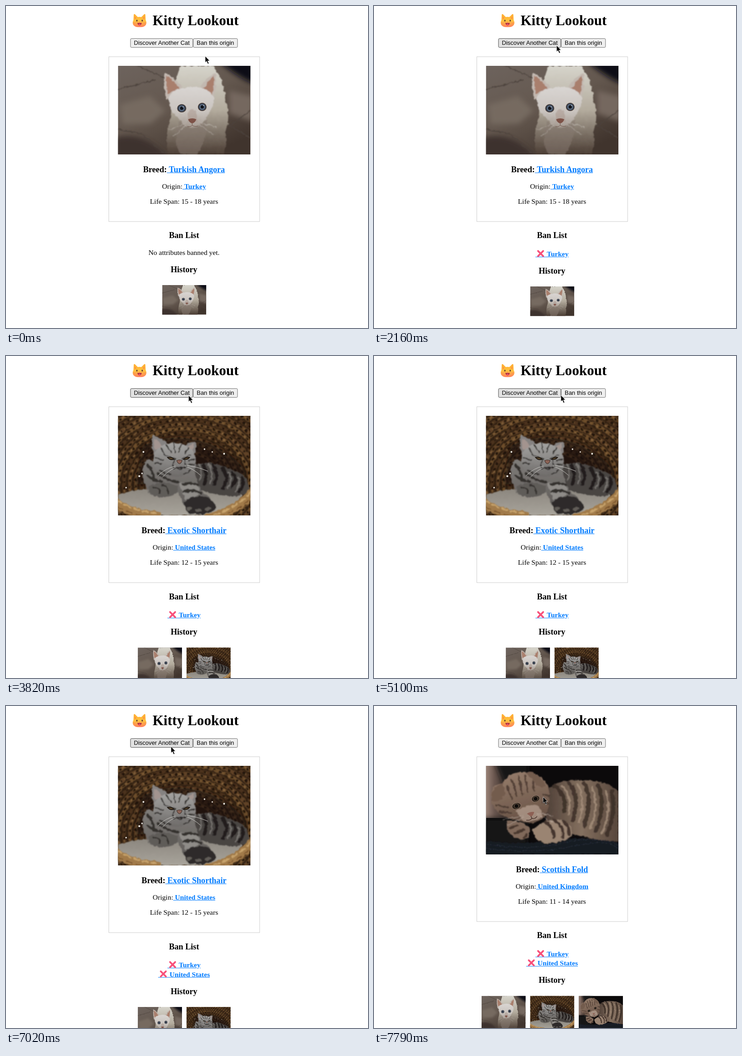
Write an HTML page that moves like this. It is 794 px wide and 705 px high and loops after 8000 ms.

```html
<!DOCTYPE html>
<html lang="en">
<head>
<meta charset="utf-8">
<title>Kitty Lookout</title>
<style>
html, body { margin: 0; width: 100%; height: 100%; overflow: hidden; background: #fff; }
#stage { position: relative; width: 794px; height: 705px; overflow: hidden; }
#page {
  position: absolute; box-sizing: border-box; width: 805px; padding-top: 73.2px;
  transform: scale(.97); transform-origin: 0 0;
  font: 16px/18px "Liberation Serif", "Times New Roman", serif; color: #000; text-align: center;
}
h1 { position: absolute; left: 331.4px; top: 14.4px; margin: 0; font-size: 32px; line-height: 37px; white-space: nowrap; }
#face { position: absolute; left: 285.6px; top: 18.4px; width: 32px; height: 30px; }
h3 { margin: 18.72px 0; font-size: 18.72px; line-height: 22px; }
p { margin: 16px 0; }
#buttons { display: flex; justify-content: center; height: 21px; }
button {
  box-sizing: border-box; height: 21px; margin: 0; padding: 0 7px; border: 1px solid #6b6b6b; border-radius: 3px;
  background: #efefef; color: #000; font: 13.333px/19px "Liberation Sans", Arial, sans-serif; white-space: nowrap;
}
button.hover { background: #e2e2e2; border-color: #454545; }
button.down { background: #f5f5f5; border-color: #8d8d8d; }
button.lit { border-color: #333; }
#card { box-sizing: border-box; width: 342px; margin: 20px auto; padding: 20px 20px 35.5px; border: 1px solid #ccc; }
#card h3 { margin-top: 22.4px; }
#card p:last-child { margin-bottom: 0; }
#card svg { display: block; width: 300px; }
a { color: #007bff; font-weight: bold; text-decoration: underline; }
.ban { height: 21px; line-height: 24px; }
.ban span { position: relative; letter-spacing: 17.9px; }
.ban svg { position: absolute; left: 2.8px; top: -.4px; width: 17.5px; height: 17.5px; }
#bans p { margin: 0; }
#thumbs { display: flex; justify-content: center; }
#thumbs svg { width: 100px; margin: 5px; }
#cursor { position: absolute; left: 0; top: 0; width: 12px; height: 19px; overflow: visible; }
.defs { position: absolute; width: 0; height: 0; }
.line { fill: none; stroke-linecap: round; stroke-linejoin: round; }
</style>
</head>
<body>
<svg class="defs">
  <defs>
    <filter id="soft">
      <feTurbulence type="fractalNoise" baseFrequency=".12" numOctaves="2" seed="4"/>
      <feDisplacementMap in="SourceGraphic" scale="7" xChannelSelector="R" yChannelSelector="G"/>
      <feGaussianBlur stdDeviation="1"/>
    </filter>
    <filter id="haze" x="-30%" y="-30%" width="160%" height="160%"><feGaussianBlur stdDeviation="6"/></filter>
    <linearGradient id="floor" x2=".7" y2="1"><stop stop-color="#6d635d"/><stop offset=".5" stop-color="#64584f"/><stop offset="1" stop-color="#40342d"/></linearGradient>
    <linearGradient id="white" x2="0" y2="1"><stop stop-color="#d6d4cb"/><stop offset=".5" stop-color="#b3ab9d"/><stop offset="1" stop-color="#4b3d34"/></linearGradient>
    <linearGradient id="pale" x2="0" y2="1"><stop stop-color="#d9d5d2"/><stop offset=".6" stop-color="#c9c3be"/><stop offset="1" stop-color="#a0958b"/></linearGradient>
    <linearGradient id="silver" x2="0" y2="1"><stop stop-color="#807d7a"/><stop offset="1" stop-color="#5c5855"/></linearGradient>
    <linearGradient id="muzzle" x2="0" y2="1"><stop stop-color="#a3a2a0"/><stop offset=".5" stop-color="#8b8987"/><stop offset="1" stop-color="#6d6a68"/></linearGradient>
    <linearGradient id="pad" x2="0" y2="1"><stop stop-color="#8a857d"/><stop offset="1" stop-color="#a8a49b"/></linearGradient>
    <linearGradient id="wall"><stop stop-color="#9b8378"/><stop offset=".25" stop-color="#6a574f"/><stop offset="1" stop-color="#0c0a0b"/></linearGradient>
    <linearGradient id="tabby" x2=".3" y2="1"><stop stop-color="#99806e"/><stop offset="1" stop-color="#6a5447"/></linearGradient>
    <linearGradient id="flank"><stop stop-color="#4d3e36"/><stop offset=".5" stop-color="#84705f"/><stop offset="1" stop-color="#56453b"/></linearGradient>
    <linearGradient id="gold" x2="0" y2="1"><stop stop-color="#ffab2e"/><stop offset=".5" stop-color="#ffc440"/><stop offset="1" stop-color="#ff7d5c"/></linearGradient>
  </defs>

  <symbol id="cat0" viewBox="0 0 291 194" preserveAspectRatio="none">
    <path fill="url(#floor)" d="M0 0H291V194H0Z"/>
    <g filter="url(#haze)">
      <path fill="#0e1017" d="M222-10H310V44Q262 26 222-10Z"/>
      <path fill="#766a61" d="M4 85 70 66 104 98 72 126 10 128Z"/>
      <path fill="#3d322d" d="M-8 158Q60 140 112 204H-8Z"/>
      <path fill="#74685e" d="M244 54 296 66V122L244 104Z"/>
    </g>
    <g filter="url(#soft)">
      <path class="line" stroke="#4c423c" stroke-width="2" d="M42 0 112 30M0 52 82 30M0 140 50 148 100 190M238 128 291 158M246 130 291 98"/>
      <path fill="url(#white)" d="M138 0H208Q232 28 237 78Q248 112 236 142Q240 170 232 194H110Q102 150 116 112Q120 40 138 0Z"/>
      <path fill="#c2b8b0" d="M106 74Q99 38 102 17Q112 14 144 50ZM179 48Q203 18 213 15Q219 34 210 74Z"/>
      <path fill="#a97f6d" d="M110 61Q104 38 106 23Q116 24 135 50ZM188 50Q203 26 211 21Q214 38 206 61Z"/>
      <path fill="url(#pale)" d="M110 72Q118 52 146 48Q164 44 182 48Q204 54 211 70Q211 94 196 110Q184 134 164 138Q145 136 136 117Q113 100 110 72Z"/>
      <path fill="#85796f" opacity=".55" d="M134 122Q162 150 196 116Q196 164 174 194H136Q120 156 134 122Z"/>
      <path fill="#a8948a" d="M154 100Q163 92 172 100L174 122H152Z" opacity=".5"/>
      <path class="line" stroke="#cdc7c2" stroke-width=".7" d="M149 126 112 140M150 130 120 155M178 124 216 134M178 129 208 150"/>
    </g>
    <path fill="#7d5247" d="M154 117Q163 113 172 117Q169 125 163 126Q157 125 154 117Z"/>
    <path class="line" stroke="#73594f" d="M163 126V130M153 133Q160 134 163 130Q168 134 175 132"/>
    <g fill="#2f3845" stroke="#594a44" stroke-width="1.2"><ellipse cx="140" cy="93" rx="9.5" ry="8.5"/><ellipse cx="185" cy="90" rx="9" ry="8.5"/></g>
    <g fill="#59687e"><circle cx="140" cy="93" r="6.5"/><circle cx="185" cy="90" r="6.5"/></g>
    <g fill="#10141c"><circle cx="140" cy="93" r="3.6"/><circle cx="185" cy="90" r="3.6"/></g>
    <g fill="#c9d1db"><circle cx="143" cy="90" r="1"/><circle cx="188" cy="87" r="1"/></g>
  </symbol>

  <symbol id="cat1" viewBox="0 0 291 218" preserveAspectRatio="none">
    <path fill="#302013" d="M0 0H291V218H0Z"/>
    <g id="weave" class="line" filter="url(#soft)"></g>
    <path fill="#120c08" opacity=".6" filter="url(#haze)" d="M54 66Q120 30 206 62Q270 96 286 130L210 150H36Z"/>
    <g fill="#e9e6df"><circle cx="56" cy="79" r="2"/><circle cx="47" cy="132" r="2.2"/><circle cx="53" cy="126" r="1.8"/><circle cx="190" cy="73" r="1.8"/><circle cx="233" cy="83" r="2"/><circle cx="207" cy="79" r="1.5"/><circle cx="18" cy="157" r="1.7"/></g>
    <g filter="url(#soft)">
      <path fill="url(#pad)" d="M0 172Q62 154 150 158Q240 160 274 174Q254 204 196 218H44Q14 204 0 190Z"/>
      <path fill="#484543" d="M164 110Q202 94 242 116Q292 126 288 166Q268 180 230 174L166 160Z"/>
      <path class="line" stroke="#211e1c" stroke-width="8" d="M188 108Q198 126 190 148M208 107Q222 124 212 150M230 116Q246 138 230 158M252 126Q264 140 250 154M272 136Q278 150 266 166"/>
      <path class="line" stroke="#77736f" stroke-width="3" d="M178 106Q186 124 180 142M199 105Q210 126 202 148M242 124Q254 140 240 158M264 134Q270 150 258 166"/>
      <path fill="url(#silver)" d="M62 96Q46 130 62 154Q64 174 86 176Q110 182 132 166L148 202Q180 220 214 204Q214 184 184 166Q170 138 166 112Z"/>
      <path fill="#8f8c88" d="M134 148Q160 140 174 152L182 172Q164 176 148 184Z"/>
      <path class="line" stroke="#35312f" stroke-width="6" d="M65 108Q80 122 78 140M65 130Q76 142 96 144M88 126Q108 142 130 144M142 150Q164 144 176 152M145 166Q166 160 182 169"/>
      <path fill="#5f5b58" d="M68 154Q98 140 130 154Q136 172 112 176Q84 180 68 168Z"/>
      <path class="line" stroke="#34302d" stroke-width="4" d="M78 156Q92 158 92 170M98 151Q112 156 110 170"/>
      <path fill="#2f2c2a" d="M146 188Q168 170 196 178Q220 190 213 206Q192 220 157 214Q144 204 146 188Z"/>
      <g fill="#625d59"><ellipse cx="157" cy="203" rx="6" ry="4"/><ellipse cx="177" cy="207" rx="7" ry="4"/><ellipse cx="198" cy="203" rx="7" ry="4"/></g>
      <path fill="#858281" d="M79 85Q72 64 76 43Q96 48 112 64ZM145 66Q158 56 172 57Q172 78 165 92Z"/>
      <path fill="#a3948f" d="M82 75Q77 60 80 50Q91 55 98 66ZM153 68Q160 61 168 61L163 78Z"/>
      <path fill="url(#muzzle)" d="M80 82Q92 60 123 59Q154 60 168 84Q175 106 166 118Q148 134 126 133Q96 130 82 114Q76 98 80 82Z"/>
      <path class="line" stroke="#302d2b" stroke-width="3" d="M106 63 116 80M122 60 125 80M139 63 134 80M94 70 103 84M154 71 147 83M82 92 99 96M81 104 96 104M168 96 155 98M168 107 157 106M92 119Q106 128 116 128M160 119 145 128"/>
      <path class="line" stroke="#252220" stroke-width="2.5" d="M105 86 126 94M158 87 141 94M126 93 119 111Q135 122 151 110L143 93M122 116Q135 109 148 115"/>
    </g>
    <path fill="#5a462b" stroke="#231d18" stroke-width="2" d="M109 91Q118 89 123 95Q115 98 109 91ZM144 95Q150 89 157 91Q152 97 144 95Z"/>
    <path fill="#8a6255" stroke="#3a2d28" d="M129 98Q135 95 141 98Q139 104 135 105Q131 104 129 98Z"/>
    <path class="line" stroke="#cfcdc9" stroke-width=".9" d="M126 110Q105 114 88 131M126 113Q108 122 98 134M147 110Q166 116 181 130M148 108Q174 111 197 121"/>
    <g filter="url(#soft)">
      <path class="line" stroke="#a17a48" stroke-width="20" d="M-6 190Q34 216 84 218M196 224Q262 210 298 164"/>
      <path class="line" stroke="#c7a36c" stroke-width="4" stroke-dasharray="13 8" d="M-3 184Q34 208 82 213M212 216Q260 202 292 166"/>
      <path class="line" stroke="#765029" stroke-width="2" stroke-dasharray="12 9" d="M0 199Q34 218 72 222M222 222Q272 202 298 176"/>
    </g>
  </symbol>

  <symbol id="cat2" viewBox="0 0 291 194" preserveAspectRatio="none">
    <path fill="#0c0a0b" d="M0 0H291V194H0Z"/>
    <path fill="url(#wall)" d="M0 0H74V114H0Z"/>
    <path fill="#191516" filter="url(#haze)" d="M20-8H92V46H42ZM-8 116H90V200H-8Z"/>
    <g filter="url(#soft)">
      <path fill="url(#flank)" d="M128 56Q158 28 204 32Q260 28 291 56V166Q248 164 192 150L132 124Z"/>
      <path class="line" stroke="#382b25" opacity=".8" stroke-width="9" d="M150 44Q178 62 172 100M181 37Q207 64 191 119M215 38Q235 69 216 131M246 42Q264 86 241 142M276 56Q286 104 265 150"/>
      <path class="line" stroke="#a8917d" opacity=".8" stroke-width="4" d="M167 44Q191 69 181 107M201 40Q220 72 204 124M232 45Q250 84 229 137M263 56Q276 98 255 147"/>
      <path fill="#171a24" d="M0 164Q80 176 166 161Q230 154 291 168V194H0Z"/>
      <path class="line" stroke="#2a303d" stroke-width="1.5" stroke-dasharray="2 3" d="M4 172Q100 186 174 168T291 174M0 181Q110 194 190 176T291 182"/>
      <path fill="#80695a" d="M46 121Q78 118 96 136Q100 157 83 162Q62 160 48 144Z"/>
      <path class="line" stroke="#4a382f" stroke-width="5" d="M52 136 70 130M63 148 82 140M83 159 90 151"/>
      <path fill="#9a8472" d="M102 140Q126 116 164 119Q190 126 189 153Q164 170 130 169Q106 163 102 140Z"/>
      <path class="line" stroke="#44352d" stroke-width="6" d="M130 124Q151 134 149 158M149 119Q172 130 169 157M169 121Q185 134 183 151"/>
      <path fill="url(#tabby)" d="M11 72Q8 42 35 39Q52 10 91 14Q126 18 137 48Q146 91 124 116Q106 130 80 122Q28 113 16 88Z"/>
      <path fill="#735b4e" d="M12 75Q8 47 36 39Q45 50 40 65Q28 85 12 75ZM86 15Q112 10 131 42Q124 51 111 43Q101 24 86 15Z"/>
      <path fill="#c5afa0" opacity=".6" d="M65 99Q84 88 109 84Q125 92 123 111Q106 127 80 119Z"/>
      <path class="line" stroke="#46362e" opacity=".8" stroke-width="4" d="M56 31Q64 46 68 68M71 22 80 63M86 22 92 58M46 44 57 73M103 34 106 56M22 86 49 91M29 100 56 103M126 63 139 65M123 79 137 84"/>
      <path class="line" stroke="#d6c8bd" stroke-width=".7" d="M82 109 37 118M83 113 49 130M112 103 147 110M112 107 146 123"/>
    </g>
    <g fill="#2c231c" stroke="#8e7868" stroke-width="1"><ellipse cx="67" cy="88" rx="10" ry="7" transform="rotate(-16 67 88)"/><ellipse cx="109" cy="72" rx="9" ry="7" transform="rotate(-18 109 72)"/></g>
    <g fill="#59483a"><circle cx="67" cy="88" r="5.5"/><circle cx="109" cy="72" r="5.5"/></g>
    <g fill="#0d0b0a"><circle cx="67" cy="88" r="4"/><circle cx="109" cy="72" r="4"/></g>
    <path fill="#8d6054" d="M90 105Q97 100 106 101Q104 109 99 111Z"/>
    <path class="line" stroke="#4a352d" stroke-width="1.5" d="M99 111 101 115M89 119Q97 120 101 115Q108 117 112 111"/>
  </symbol>
</svg>

<div id="stage">
  <div id="page">
    <svg id="face" viewBox="0 0 32 30">
      <path fill="url(#gold)" d="M3 1Q4-1 6 1L12 7Q16 6 20 7L26 1Q28-1 29 1L30 14Q33 20 30 25Q26 30 16 30T2 25Q-1 20 2 14Z"/>
      <path fill="#ff9142" d="M5 5 9 9 5 13ZM27 5 23 9 27 13Z"/>
      <path class="line" stroke="#f58a45" stroke-width=".8" d="M1 20H6M2 23 6 22M31 20H26M30 23 26 22"/>
      <g fill="#5c3c2e"><ellipse cx="10" cy="15" rx="1.5" ry="2"/><ellipse cx="22" cy="15" rx="1.5" ry="2"/></g>
      <path fill="#a62843" d="M11 20Q16 21.500 21 20Q20 26 16 26T11 20Z"/>
      <path fill="#ff5b74" d="M13 24Q16 21.500 19 24Q16 27 13 24Z"/>
      <path fill="#e55c52" d="M14.500 18H17.500L16 19.500Z"/>
    </svg>
    <h1>Kitty Lookout</h1>
    <div id="buttons"><button>Discover Another Cat</button><button>Ban this origin</button></div>
    <div id="card">
      <div id="photo"></div>
      <h3>Breed:<a id="breed"></a></h3>
      <p>Origin:<a id="origin"></a></p>
      <p id="life"></p>
    </div>
    <h3>Ban List</h3>
    <div id="bans"></div>
    <h3>History</h3>
    <div id="thumbs"></div>
  </div>
  <svg id="cursor" viewBox="0 0 12 19">
    <path fill="#000" stroke="#fff" stroke-width=".6" d="M0 0V13.6L3.1 10.8 5.7 16.8 8 15.8 5.4 10H9.6Z"/>
  </svg>
</div>

<script>
const LOOP = 8000;
const $ = id => document.getElementById(id);
const buttons = document.querySelectorAll('button');

const cats = [
  { breed: 'Turkish Angora', origin: 'Turkey', life: '15 - 18', h: 200 },
  { breed: 'Exotic Shorthair', origin: 'United States', life: '12 - 15', h: 225 },
  { breed: 'Scottish Fold', origin: 'United Kingdom', life: '11 - 14', h: 200 }
];

// Views: cat, photo on show, number of bans, newest thumbnail (0 empty, 1 first rows, 2 loaded)
const views = [
  [0, 0, 0, 2], [0, 0, 1, 2],
  [1, 0, 1, 0], [1, 0, 1, 1], [1, 1, 1, 2], [1, 1, 2, 2],
  [2, 1, 2, 0], [2, 1, 2, 1], [2, 2, 2, 2]
];

// Steps: time, pointer x, y, first button, second button, view
const H = 'hover', D = 'down', L = 'lit';
const steps = [
  [0, 437, 110, '', '', 0],
  [130, 435, 115, '', '', 0],
  [280, 424, 86, '', H, 0],
  [1140, 424, 86, '', D, 0],
  [1290, 424, 86, '', L, 1],
  [1790, 413, 87, '', L, 1],
  [1910, 401, 85, H, '', 1],
  [2160, 400.5, 86.5, H, '', 1],
  [2840, 400.5, 86.5, D, '', 1],
  [2990, 400.5, 86.5, H, '', 1],
  [3580, 400.5, 86.5, H, '', 2],
  [3700, 400.5, 86.5, H, '', 3],
  [3820, 400.5, 86.5, H, '', 4],
  [5100, 410, 86, H, '', 4],
  [5220, 417, 86.5, '', H, 4],
  [5650, 417, 86.5, '', D, 4],
  [5800, 417, 86.5, '', L, 5],
  [6240, 412, 95, '', '', 5],
  [6360, 390, 109, '', '', 5],
  [6480, 369, 98, '', '', 5],
  [6600, 362, 89, H, '', 5],
  [6900, 362, 89, D, '', 5],
  [7020, 362, 89, H, '', 5],
  [7550, 362, 89, H, '', 6],
  [7670, 365, 130, '', '', 7],
  [7790, 371, 199, '', '', 8]
];

const picture = (i, h, style = '') =>
  `<svg style="height:${h}px;${style}"><use href="#cat${i}" width="100%" height="100%"/></svg>`;

const cross = '<svg viewBox="0 0 18 18"><path class="line" stroke="#f8507a" stroke-width="4" d="M3 3 15 15M15 3 3 15"/></svg>';
const banRow = cat => `<div class="ban"><a><span>&nbsp;${cross}</span> ${cat.origin}</a></div>`;

// Rows of wicker: a lit strand with dark gaps between its leaves
function weave() {
  const tones = ['#604326', '#4c331c', '#6d4d2c'];
  const ring = (i, color, width, dash) =>
    `<ellipse cx="145" cy="150" rx="${80 + i * 13}" ry="${72 + i * 10}" stroke="${color}"
      stroke-width="${width}" stroke-dasharray="${dash}" stroke-dashoffset="${i * 8}"/>`;
  let rows = '';
  for (let i = 0; i < 14; i++) {
    rows += ring(i, tones[i % 3], 8, 'none') + ring(i, '#8a6840', 2, '6 14') + ring(i, '#21150c', 5, '2 12');
  }
  $('weave').innerHTML = rows;
}

function showView([cat, photo, bans, loaded]) {
  const info = cats[cat];
  $('photo').innerHTML = picture(photo, cats[photo].h);
  $('breed').textContent = '\u00a0' + info.breed;
  $('origin').textContent = '\u00a0' + info.origin;
  $('life').textContent = `Life Span: ${info.life} years`;
  $('bans').innerHTML = bans ? cats.slice(0, bans).map(banRow).join('') : '<p>No attributes banned yet.</p>';

  const seen = cats.slice(0, cat + 1);
  const known = loaded ? seen : seen.slice(0, -1);
  const height = Math.max(...known.map(c => c.h)) / 3;
  const clip = ['visibility:hidden', 'clip-path:inset(0 0 98% 0)', ''][loaded];
  $('thumbs').innerHTML = seen.map((c, i) => picture(i, height, i === cat ? clip : '')).join('');
}

let last = -1, lastView = -1;
function draw(now) {
  const t = now % LOOP;
  const n = steps.findLastIndex(s => s[0] <= t);
  if (n !== last) {
    const [, x, y, first, second, view] = steps[n];
    $('cursor').style.transform = `translate(${x}px, ${y}px)`;
    buttons[0].className = first;
    buttons[1].className = second;
    if (view !== lastView) showView(views[view]);
    last = n;
    lastView = view;
  }
}

function tick() {
  draw(performance.now() - start);
  requestAnimationFrame(tick);
}

weave();
const start = performance.now();
tick();
</script>
</body>
</html>
```
